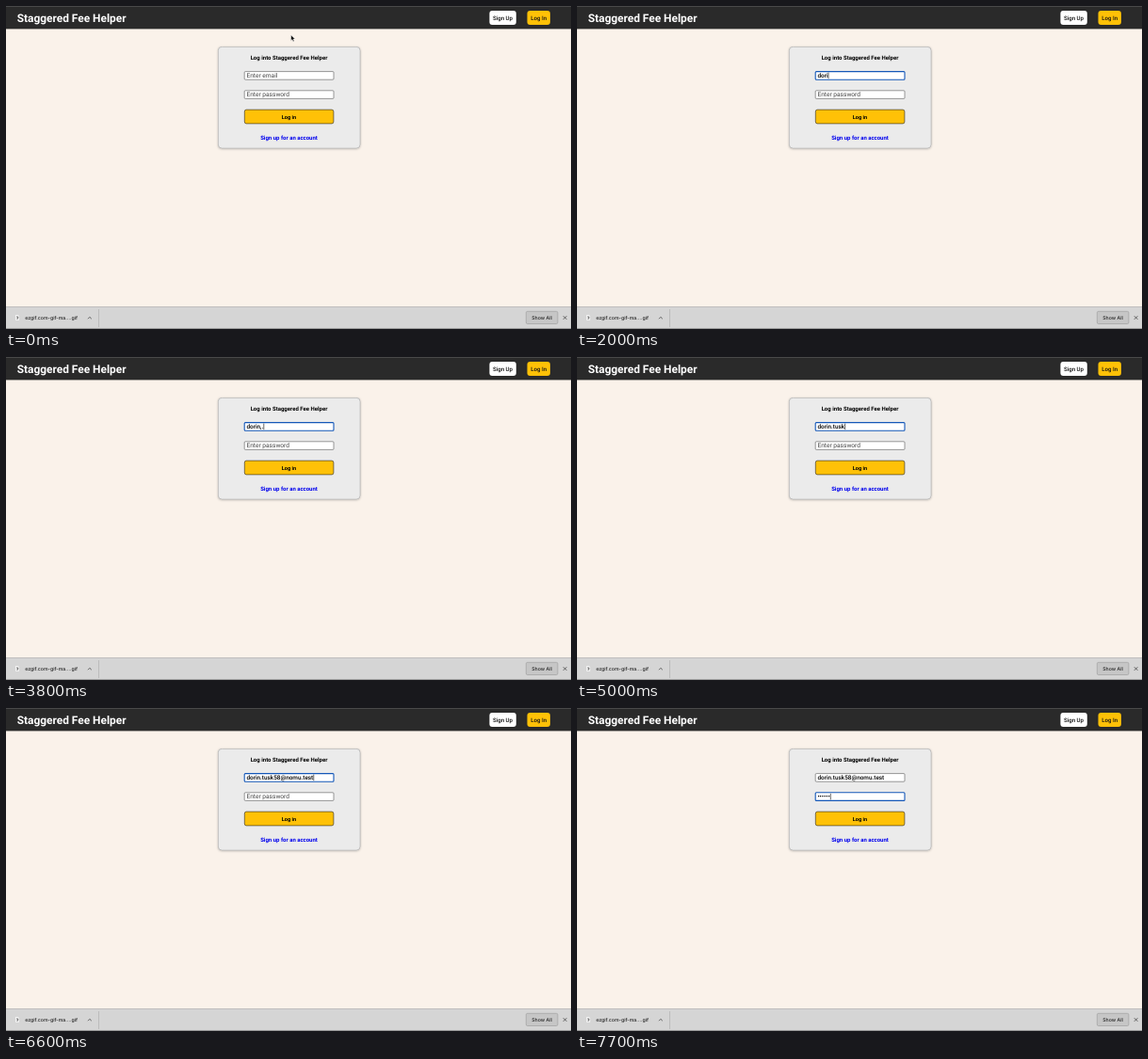
These frames come from a looping animation (600x343 px, 8000 ms). An HTML page:

```html
<!DOCTYPE html>
<html lang="en">
<head>
<meta charset="utf-8">
<title>Log in</title>
<style>
  html, body { margin: 0; width: 100%; height: 100%; overflow: hidden; background: #faf2ea; }
  svg { display: block; width: 100vw; height: 100vh; }
  text { font: 700 6px Roboto, sans-serif; text-rendering: geometricPrecision; white-space: pre; }
  .mid { text-anchor: middle; }
  .nav { font-size: 6.1px; font-weight: 500; fill: #111; }
  .ui { font: 500 5.2px Inter, sans-serif; fill: #222; }
  .field rect { fill: #fff; stroke: #555; stroke-width: .6; }
  .field.focus rect { stroke: #1558b8; stroke-width: 1.1; }
  .field text { font-size: 6.4px; font-weight: 500; }
  .field.empty text { font-size: 6.6px; font-weight: 400; fill: #444; }
  .field path { stroke: #000; stroke-width: .6; visibility: hidden; }
  .field.focus.caret path { visibility: visible; }
</style>
</head>
<body>
<svg viewBox="0 0 600 343">
  <defs>
    <filter id="shadow" x="-5%" y="-5%" width="110%" height="112%">
      <feDropShadow dx="0" dy=".6" stdDeviation="1" flood-opacity=".25"/>
    </filter>
  </defs>
  <rect width="600" height="343" fill="#faf2ea"/>

  <rect width="600" height="24.4" fill="#2a2a2a"/>
  <rect width="600" height="1" fill="#4a4a4a"/>
  <text x="11.8" y="16.8" style="font-size:11.9px" fill="#fff">Staggered Fee Helper</text>
  <rect x="513.4" y="4.9" width="28.4" height="15" rx="3" fill="#fff"/>
  <text class="nav mid" x="527.5" y="14.5">Sign Up</text>
  <rect x="553.5" y="4.9" width="24.4" height="15" rx="3" fill="#ffc107"/>
  <text class="nav mid" x="565.7" y="14.5">Log In</text>

  <rect x="225.3" y="43.3" width="150.8" height="107.8" rx="4" fill="#ebebeb" stroke="#a2a2a2" stroke-width=".6" filter="url(#shadow)"/>
  <text class="mid" x="300.5" y="56.5">Log into Staggered Fee Helper</text>
  <g id="email" class="field">
    <rect x="253.2" y="69.6" width="94.8" height="8.6" rx="1"/>
    <text x="255.4" y="76.1"></text>
    <path d="M0 70.6v6.6"/>
  </g>
  <g id="password" class="field">
    <rect x="253.2" y="89.8" width="94.8" height="8.6" rx="1"/>
    <text x="255.4" y="96.3"></text>
    <path d="M0 90.8v6.6"/>
  </g>
  <rect x="253.3" y="110.1" width="94.6" height="14.8" rx="2" fill="#ffc107" stroke="#222" stroke-width=".6"/>
  <text class="mid" x="300.5" y="119.5" style="font-size:5.6px">Log in</text>
  <text class="mid" x="300.5" y="141.7" fill="#00e">Sign up for an account</text>

  <rect y="319.3" width="600" height="23.7" fill="#d5d5d5"/>
  <path d="M0 319.5H600M98.5 322v19" stroke="#b2b2b2" stroke-width=".7"/>
  <rect y="342" width="600" height="1" fill="#9a9a9a"/>
  <path d="M10 328h2.8l1.2 1.2v4.6h-4z" fill="#f4f4f4"/>
  <path d="M11 330h1.8v1.4h-.8v1.4" fill="none" stroke="#444" stroke-width=".7"/>
  <text class="ui" x="20.3" y="333.2">ezgif.com-gif-ma….gif</text>
  <path d="M87 332.2l1.9-1.9 1.9 1.9M591.8 329.2l3.6 3.6m0-3.6l-3.6 3.6" fill="none" stroke="#444" stroke-width=".8"/>
  <rect x="552.3" y="324.3" width="33.6" height="13.2" rx="1.5" fill="#c6c6c6" stroke="#999" stroke-width=".6"/>
  <text class="ui mid" x="569" y="332.8">Show All</text>

  <path id="arrow" d="M0 0v5.7l1.3-1.2 1 2.2 1-.4-1-2.2h1.8z" stroke="#fff" stroke-width=".4"/>
  <path id="beam" d="M-1.2-3.2Q0-3.2 0-2.4 0-3.2 1.2-3.2M0-2.4V2.4M-1.2 3.2Q0 3.2 0 2.4 0 3.2 1.2 3.2M-.7 1h1.4" fill="none" stroke="#222" stroke-width=".7"/>
</svg>
<script>
const LOOP = 8000, STEP = 100;
const EMAIL_FOCUS = 900, TYPING = 1700, PASSWORD_FOCUS = 6800;
const $ = id => document.getElementById(id);

// Each key is [time, character]; "<" deletes.
const keys = (text, times) => [...text].map((char, i) => [times[i], char]);
const emailKeys = keys('dorin,.<<.tusk58@nomu.test', [
  1700, 1800, 1900, 2000, 2200, 2800, 3400, 3900, 4100, 4300, 4500, 4700, 4900,
  5000, 5200, 5400, 5500, 5700, 5800, 5900, 6100, 6200, 6300, 6400, 6500, 6600]);
const passwordKeys = keys('••••••', [7100, 7200, 7300, 7400, 7600, 7700]);

const typed = (list, t) => list.reduce((text, [time, char]) =>
  time > t ? text : char === '<' ? text.slice(0, -1) : text + char, '');

function drawField(id, value, placeholder, focused, caret) {
  const field = $(id), text = field.querySelector('text');
  field.classList.toggle('empty', !value);
  field.classList.toggle('focus', focused);
  field.classList.toggle('caret', caret);
  text.textContent = value || placeholder;
  const end = value ? text.getComputedTextLength() + .4 : 0;
  field.querySelector('path').setAttribute('transform', `translate(${255.5 + end})`);
}

function drawPointer(t) {
  let x = 302.7, y = 31;
  if (t >= 100) {
    const p = Math.min(1, Math.max(0, (t - 200) / 500));
    const eased = p * p * (3 - 2 * p);
    x = 293.3 - 4.5 * eased;
    y = 22.3 + 54.7 * eased;
  }
  const overField = y > 69;
  $('arrow').style.display = overField ? 'none' : '';
  $('beam').style.display = overField && t < TYPING ? '' : 'none';
  for (const id of ['arrow', 'beam']) $(id).setAttribute('transform', `translate(${x} ${y})`);
}

function draw(now) {
  const t = Math.floor(now % LOOP / STEP) * STEP;
  const onEmail = t >= EMAIL_FOCUS && t < PASSWORD_FOCUS;
  drawField('email', typed(emailKeys, t), 'Enter email', onEmail, t < 1400 || t >= TYPING);
  drawField('password', typed(passwordKeys, t), 'Enter password', t >= PASSWORD_FOCUS, true);
  drawPointer(t);
}

const start = performance.now();
function tick() {
  draw(performance.now() - start);
  requestAnimationFrame(tick);
}
tick();
</script>
</body>
</html>
```
